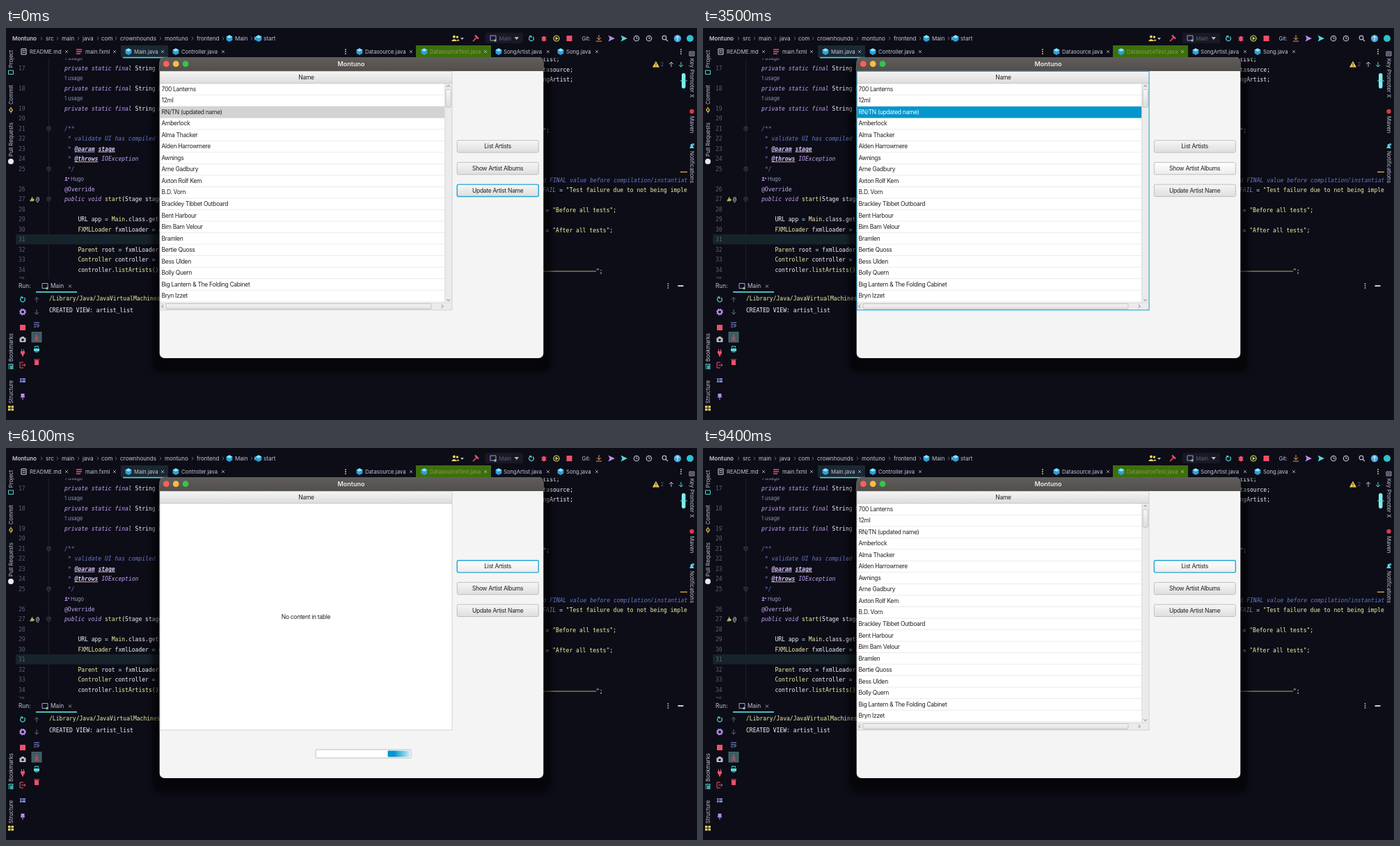
Write an HTML page that moves like this. It is 993 by 564 pixels and loops after 9.5 s.

```html
<!DOCTYPE html>
<html lang="en">
<head>
<meta charset="utf-8">
<title>Montuno</title>
<style>
html, body { margin: 0; width: 100%; height: 100%; overflow: hidden; background: #0c0d17; }
svg { display: block; width: 993px; height: 564px; }
text { white-space: pre; font: 7.7px Inter, sans-serif; fill: #c4c6d4; }
.crumb { font-size: 8.1px; }
.b { font-weight: 600; }
.code { font: 8.04px "DejaVu Sans Mono", monospace; fill: #f4f4f8; }
.fx { font-size: 8.5px; letter-spacing: -.035em; fill: #222; }
.mid { text-anchor: middle; }
.k { fill: #c3a0f2; font-style: italic; }
.a { fill: #c8a8f4; }
.c { fill: #6878c8; font-style: italic; }
.d { fill: #dcc8ff; font-style: italic; font-weight: bold; text-decoration: underline; }
.y { fill: #f3f4a6; }
.f { fill: #8f9bc4; font-style: italic; }
.g { fill: #5c6078; }
.n { fill: #a6ecf2; }
</style>
</head>
<body>
<svg id="stage" viewBox="0 0 993 564"></svg>
<script>
const LOOP = 9500, ROW = 16.53, ACCENT = '#0396cd', BACK = '#0c0d17';
const PURPLE = '#b98cf0', RED = '#f0506a', TEAL = '#5cd6d8', GREY = '#b9bccb', YELLOW = '#f2d75c';

// Drawing helpers: each returns SVG markup; text is placed by its vertical centre.
const esc = s => s.replace(/&/g, '&amp;').replace(/</g, '&lt;');
const text = (x, y, s, cls = '', more = '') => `<text x="${x}" y="${y + 2.9}" class="${cls}" ${more}>${esc(s)}</text>`;
const rect = (x, y, w, h, fill, more = '') => `<rect x="${x}" y="${y}" width="${w}" height="${h}" fill="${fill}" ${more}/>`;
const path = (d, stroke = GREY, more = '') => `<path d="${d}" fill="none" stroke="${stroke}" ${more}/>`;
const shape = (d, fill) => `<path d="${d}" fill="${fill}"/>`;
const dot = (x, y, r, fill, more = '') => `<circle cx="${x}" cy="${y}" r="${r}" fill="${fill}" ${more}/>`;
const group = (id, s, more = '') => `<g id="${id}" ${more}>${s}</g>`;
const side = (x, y, s, turn) => `<text class="mid" transform="translate(${x} ${y}) rotate(${turn})" y="2.8">${s}</text>`;
const code = (x, y, ...parts) => `<text class="code" x="${x}" y="${y + 2.9}">` +
  parts.map(p => `<tspan class="${p[0]}">${esc(p.slice(2))}</tspan>`).join('') + '</text>';

// Icons
const cross = (x, y = 34) => path(`M${x - 2} ${y - 2}l4 4m0-4l-4 4`, GREY, 'stroke-width=".8"');
const cube = (x, y = 34) => shape(`M${x} ${y - 4.8}l4.4 2.3v5l-4.4 2.4l-4.4-2.4v-5z`, '#2d9fd8') +
  shape(`M${x} ${y - 4.8}l4.4 2.3l-4.4 2.4l-4.4-2.4z`, '#8be4f4');
const kebab = (x, y, c = GREY) => [-3, 0, 3].map(d => dot(x, y + d, .9, c)).join('');
const ring = (x, y, r, c) => dot(x, y, r, 'none', `stroke="${c}" stroke-width="1.2"`);
const reload = (x, y, c) => path(`M${x + 2} ${y - 2.6}a3.4 3.4 0 1 1-4 0`, c, 'stroke-width="1.2"') + shape(`M${x - 3.6} ${y - 4}h4v3.6z`, c);
const arrow = (x, y, dir, c = GREY) => path(`M${x} ${y - 3.5}v7M${x - 3} ${y + dir * .5}l3 ${dir * 3}l3 ${-dir * 3}`, c);
const chevron = (x, y, dx, dy) => path(`M${x - dx * 1.2 - dy * 2.4} ${y - dy * 1.2 - dx * 2.4}L${x + dx * 1.2} ${y + dy * 1.2}L${x - dx * 1.2 + dy * 2.4} ${y - dy * 1.2 + dx * 2.4}`, '#666', 'stroke-width=".9"');
const plane = (x, y, c) => shape(`M${x - 4.5} ${y - 4.5}L${x + 5} ${y}L${x - 4.5} ${y + 4.5}l2-4.5z`, c);
const clock = (x, y, c) => ring(x, y, 3.7, c) + path(`M${x} ${y - 2.2}v2.4h2`, c);
const bug = (x, y, c) => `<ellipse cx="${x}" cy="${y + .5}" rx="2.8" ry="3.8" fill="${c}"/>` + path(`M${x - 4} ${y - 2}l8 5m0-5l-8 5`, c, 'stroke-width=".8"');
const terminal = (x, y) => path(`M${x - 4} ${y - 4}h8v7h-8z`, PURPLE) + dot(x + 3, y + 3, 1.7, '#68e27c');

function topBar() {
  const crumbs = [[57, 'src'], [80, 'main'], [110, 'java'], [137, 'com'], [164, 'crownhounds'], [228, 'montuno'], [274, 'frontend'], [329, 'Main'], [370, 'start']];
  let s = text(9, 15, 'Montuno', 'crumb b') + crumbs.map(c => text(c[0], 15, c[1], 'crumb')).join('');
  for (const x of [51, 74, 104, 132, 158, 222, 268, 312, 353])
    s += path(`M${x - 1} 12.7l2 2.3l-2 2.3`, '#777b92', 'stroke-width=".8"');
  s += cube(321, 15) + shape('M357 12l3.5 3l-3.5 3z', '#6ea8f0') + cube(363, 15);
  s += dot(644, 12.5, 2, YELLOW) + shape('M640 19q4-6 8 0z', YELLOW) + dot(648.5, 13, 1.7, YELLOW) + shape('M647 18.5q3-4 4.5 0z', YELLOW) + shape('M653 14h5l-2.5 3z', GREY);
  s += path('M671 19l6-6', RED, 'stroke-width="1.6"') + path('M674 10.5l5 5', RED, 'stroke-width="2.4"');
  s += rect(689, 7, 54, 15, '#181924', 'rx="2"') + terminal(700, 15) + text(708.5, 15, 'Main', 'g') + shape('M730.5 13h6.5l-3.2 4z', GREY);
  s += reload(755, 15, TEAL) + bug(773, 15, RED) + ring(791, 15, 4, '#d8e05c') + shape('M789.7 12.5l4 2.5l-4 2.5z', '#d8e05c') + rect(805.5, 11, 8, 8, RED);
  s += text(827.5, 15, 'Git:') + arrow(852, 13.5, 1, '#f59a50') + path('M848 19h8', '#f59a50') + plane(870, 15, PURPLE) + plane(888, 15, TEAL) + clock(906, 15, GREY) + clock(924, 15, GREY);
  return s + ring(946, 14, 2.8, GREY) + path('M948 16l3 3', GREY, 'stroke-width="1.2"') + dot(965, 15, 5.2, '#3fa6e0') + arrow(965, 15, -1, '#fff') + dot(983, 15, 5, '#2fc0cc');
}

function tabs() {
  let s = rect(14, 24, 965, 19.5, BACK) + rect(165, 25, 68, 17, '#1a2833') + rect(168, 41.8, 65, 1.6, TEAL) + rect(589, 25, 108, 17, '#3d6f0c');
  s += path('M22 30h7v8h-7zM23.5 32.5h4m-4 2.5h4', '#ddd') + path('M101 31h8m-8 3h8m-8 3h6', RED, 'stroke-width="1.5"');
  const names = [[34, 'README.md'], [114, 'main.fxml'], [184, 'Main.java'], [252, 'Controller.java'], [516, 'Datasource.java'], [715, 'SongArtist.java'], [805, 'Song.java']];
  s += names.map(n => text(n[0], 34, n[1])).join('') + text(609, 34, 'DatasourceTest.java', '', 'style="fill:#8a9a55"');
  s += [176, 244, 508, 601, 708, 797].map(x => cube(x)).join('');
  s += [87, 156, 225, 312, 582, 689, 779, 849].map(x => cross(x)).join('');
  return s + kebab(488, 34, YELLOW) + kebab(970, 34, YELLOW);
}

function editor() {
  const at = k => 58 + 14.48 * k;
  let s = rect(14, at(17) - 7.3, 207, 14.5, '#17232b') + path('M61.5 44V361', '#1d1f2e');
  const numbered = [0, 2, 4, 5, 6, 7, 8, 9, 10, 12, 13, 14, 15, 16, 17, 18, 19, 20, 21];
  numbered.forEach((k, i) => s += code(18, at(k), 'g:' + (17 + i)));
  for (const k of [-1, 1, 3]) s += text(84, at(k), '1 usage', '', 'style="font-size:7.4px;fill:#8d90b4"');
  for (const k of [0, 2, 4]) s += code(84, at(k), 'k:private static final ', 'w:String ', 'f:' + 'MMF'[k / 2]);
  s += code(84, at(6), 'c:/**') + code(84, at(7), 'c: * validate UI has compiled');
  s += code(84, at(8), 'c: * ', 'd:@param', 'c: ', 'd:stage') + code(84, at(9), 'c: * ', 'd:@throws', 'c: ', 'k:IOException') + code(84, at(10), 'c: */');
  const wave = (x, y, n) => path(`M${x} ${y}` + 'l1.5-1.5l1.5 1.5'.repeat(n), '#c79a45', 'stroke-width=".7"');
  s += wave(133, at(8) + 5, 8) + wave(98, at(9) + 5, 11);
  s += dot(86.5, at(11) - 1.5, 1.4, PURPLE) + shape(`M84 ${at(11) + 2.5}q2.5-4 5 0z`, PURPLE) + dot(90, at(11) - 1, 1.1, PURPLE) + text(93, at(11), 'Hugo', '', 'style="font-size:7.4px;fill:#9a9cc0"');
  s += code(84, at(12), 'a:@Override') + code(84, at(13), 'k:public void ', 'y:start', 'w:(Stage stage)');
  s += shape(`M34 ${at(13) + 3}l4-7l1 7z`, '#7cc86c') + dot(39, at(13) + 1, 1.7, '#f59a50') + code(43, at(13), 'w:@');
  s += code(103.4, at(15), 'w:URL app ', 'n:= ', 'y:Main', 'w:.class.get') + code(103.4, at(16), 'y:FXMLLoader', 'w: fxmlLoader ', 'n:= ', 'k:n');
  s += code(103.4, at(18), 'y:Parent', 'w: root ', 'n:= ', 'w:fxmlLoader.') + code(103.4, at(19), 'y:Controller', 'w: controller ', 'n:= ') + code(103.4, at(20), 'w:controller.', 'y:listArtists()');
  for (const k of [6, 10, 13]) s += path(`M59 ${at(k) - 2.5}h5v4l-2.5 2l-2.5-2zM60 ${at(k)}h3`, '#4c5068', 'stroke-width=".8"');

  s += code(771.5, 45.2, 'w:tist;') + code(771.5, 59.7, 'w:tasource;') + code(771.5, 74.2, 'w:ngArtist;') + code(771.5, 146.7, 'n:*;');
  s += code(771.5, 219, 'c:d FINAL value before compilation/instantiat') + code(771, 233.5, 'f:FAIL', 'n: = ', 'y:"Test failure due to not being imple');
  s += code(775.6, 262.5, 'n:= ', 'y:"Before all tests"', 'w:;') + code(775.6, 291.5, 'n:= ', 'y:"After all tests"', 'w:;');
  s += path('M771 350H848', '#d9dc92', 'stroke-width=".8"') + code(848, 350, 'y:"', 'w:;');
  s += shape('M934 47.5l5 9h-10z', '#f2c850') + path('M934 50.5v3m0 1v1', '#222') + text(940.5, 52.5, '2', 'g') + arrow(956, 52.5, -1) + arrow(970, 52.5, 1, TEAL);
  return s + rect(971, 65, 5.5, 22, '#7deef0', 'rx="2.7"') + path('M969 76h10', TEAL) + rect(969, 206.5, 10, 1.5, '#c9a040');
}

function sideBars() {
  let s = side(7, 44.5, 'Project', -90) + side(7, 96, 'Commit', -90) + side(7, 160.5, 'Pull Requests', -90) + side(7, 459.5, 'Bookmarks', -90) + side(7, 523.5, 'Structure', -90);
  s += side(985.5, 72, 'Key Promoter X', 90) + side(985.5, 139, 'Maven', 90) + side(985.5, 200, 'Notifications', 90);
  s += path('M3.5 61h7v5.5h-7z', TEAL) + ring(7, 118, 2, YELLOW) + path('M7 113.5v2.5m0 4v2.5', YELLOW) + dot(7, 192, 4, '#e8e8ee');
  s += rect(3.5, 483, 7, 8, '#3fa9a8') + path('M5 491V485h4', BACK) + rect(3, 543.5, 8, 7, YELLOW) + path('M3 547h8M7 543v8', BACK);
  return s + path('M982 34h7v6h-7zM983 36h5m-5 2h5', GREY, 'stroke-width=".9"') + dot(985.5, 120, 3.2, '#d83a48') + shape('M982 173q2-2 2-6h3q0 4 2 6z', TEAL) + dot(987.5, 167.5, 1.8, '#5aa0f0');
}

function runPanel() {
  let s = rect(14, 361, 965, 201, BACK) + text(18, 371.5, 'Run:', '', 'style="font-size:8.3px"') + terminal(56, 371.5) + text(64, 371.5, 'Main', '', 'style="font-size:8.3px"') + cross(92, 371.5) + rect(43, 379, 59, 1.7, TEAL);
  s += kebab(951.5, 371) + rect(965.5, 370.2, 8, 1.7, '#eee');
  s += code(62, 389.5, 'y:/Library/Java/JavaVirtualMachines/') + code(62, 406, 'w:CREATED VIEW: artist_list');
  s += reload(24, 390.5, TEAL) + dot(24, 408.5, 3, 'none', `stroke="${PURPLE}" stroke-width="2"`) + dot(24, 408.5, 4.2, 'none', `stroke="${PURPLE}" stroke-width="1.4" stroke-dasharray="1.65"`) + rect(20, 427, 8, 8, RED);
  s += rect(19.5, 445.5, 9, 6.5, GREY, 'rx="1"') + rect(22, 444, 4, 2, GREY) + dot(24, 448.7, 1.8, BACK) + shape('M21 465h6v3l-2 2.5v2h-2v-2l-2-2.5z', RED) + path('M22.5 462v3m3-3v3', RED);
  s += path('M25 481h-5v8h5M22 485h6m-2-2l2 2l-2 2', RED) + rect(20, 504, 8, 6, '#7d86d8') + path('M20 506.5h8M23 504v6', BACK, 'stroke-width=".8"') + shape('M21.5 526h5v4l1 1.5h-7l1-1.5z', PURPLE) + path('M24 531v4', PURPLE);
  s += arrow(44, 391, -1, '#666a80') + arrow(44, 408.5, 1, '#666a80') + path('M40 424h8m-8 3h7q1.5 3-3 3m-4 0h3', '#8c9af0') + rect(37, 437.5, 14, 14.5, '#3c5a60', 'stroke="#5c8c90" stroke-width=".6"') + arrow(44, 444, 1, RED) + path('M40.5 449h7', RED);
  return s + rect(40, 461, 8, 4, TEAL) + path('M41.5 460v-2h5v2M41.5 466h5', TEAL) + rect(41, 478, 6, 7, RED) + path('M40 477h8', RED);
}

const artists = ['700 Lanterns', '12ml', 'RN/TN (updated name)', 'Amberlock', 'Alma Thacker', 'Alden Harrowmere', 'Awnings', 'Arne Gadbury', 'Axton Rolf Kem',
  'B.D. Vorn', 'Brackley Tibbet Outboard', 'Bent Harbour', 'Bim Bam Velour', 'Bramlen', 'Bertie Quoss', 'Bess Ulden', 'Bolly Quern', 'Big Lantern & The Folding Cabinet', 'Bryn Izzet'];
const albums = ['For Ships Bound To Drift (We Await Dawn)', "If They Seek Smoke They'll See It"];

const rows = list => list.map((s, i) => text(223.5, 87.8 + ROW * i, s, 'fx', i == 2 ? 'id="picked"' : '')).join('');
const rules = w => Array.from({ length: 19 }, (_, i) => rect(221, 95.8 + ROW * i, w, .8, '#e6e6e6')).join('');
const thumb = (x, y, w, h) => rect(x, y, w, h, 'url(#normal)', 'rx="1.5" stroke="#b5b5b5" stroke-width=".7"');
const hbar = end => rect(221, 395.3, 420, 10.2, '#ebebeb') + rect(221, 395, 420, .7, '#cfcfcf') + thumb(230, 396.8, end - 230, 7.6) + chevron(225, 400.5, -1, 0) + chevron(end == 611 ? 627 : 637, 400.5, 1, 0);

function appWindow() {
  let s = rect(209.5, 50, 574, 446, '#000', 'rx="14" opacity=".55" filter="url(#blur)"') + rect(220.7, 42, 551.6, 433, '#f4f4f4', 'rx="7"');
  s += shape('M220.7 62V49q0-7 7-7h537.6q7 0 7 7v13z', 'url(#title)') + dot(230.3, 51.7, 4.4, '#fc605b') + dot(244.2, 51.7, 4.4, '#fdbc40') + dot(258, 51.7, 4.4, '#34c648');
  s += text(496, 51.7, 'Montuno', 'b mid', 'style="font-size:9px;fill:#ececec"') + rect(221, 62, 420.5, 344, '#fff');
  s += group('artists', rules(410) + rect(221, 112.9, 409.5, ROW, '#d3d3d3', 'id="pick"') + rows(artists) + hbar(611) +
    rect(630.5, 80, 10.5, 315.5, '#ebebeb') + rect(630.5, 80, .7, 315.5, '#cfcfcf') + thumb(632, 88.5, 7.4, 25.5) + chevron(635.7, 83.5, 0, -1) + chevron(635.7, 391.5, 0, 1));
  s += group('albums', rules(420) + rows(albums) + hbar(631));
  s += group('loading', text(431, 242.7, 'No content in table', 'fx mid') +
    rect(445, 434, 137.2, 12, '#fff', 'rx="1.5" stroke="#b6b6b6" stroke-width=".9"') +
    group('track', rect(2.1, 435.6, 37.2, 8.8, 'url(#tail)', 'id="bar" rx="1"'), 'clip-path="url(#inside)"'));
  s += rect(221, 62, 420, 18, 'url(#head)') + rect(221, 79.3, 420, .8, '#c4c4c4') + text(431.5, 71, 'Name', 'fx mid');
  s += rect(221.2, 62.3, 419.9, 343.5, 'none', 'id="frame"');
  ['List Artists', 'Show Artist Albums', 'Update Artist Name'].forEach((label, i) => {
    const y = 161.7 + 31.7 * i;
    s += rect(648.3, y, 117, 17.4, 'none', `id="btn${i}" rx="2"`) + text(706.7, y + 8.6, label, 'fx mid');
  });
  return s;
}

const fade = (id, stops, more = 'x2="0" y2="1"') => `<linearGradient id="${id}" ${more}>` +
  stops.map(([o, c, a = 1]) => `<stop offset="${o}" stop-color="${c}" stop-opacity="${a}"/>`).join('') + '</linearGradient>';
const defs = '<defs>' + fade('title', [[0, '#605d5b'], [1, '#514e4c']]) + fade('head', [[0, '#f5f5f5'], [1, '#dcdcdc']]) +
  fade('normal', [[0, '#f6f6f6'], [1, '#dedede']]) + fade('hover', [[0, '#ffffff'], [1, '#ebebeb']]) + fade('armed', [[0, '#d6d6d6'], [1, '#c8c8c8']]) +
  fade('tail', [[0, ACCENT], [.25, ACCENT], [1, ACCENT, 0]], '') +
  '<filter id="blur"><feGaussianBlur stdDeviation="3"/></filter><clipPath id="inside"><rect x="446.5" y="435" width="134.2" height="10"/></clipPath></defs>';

const stage = document.getElementById('stage');
stage.innerHTML = defs + topBar() + editor() + tabs() + sideBars() + runPanel() + appWindow();

const $ = id => document.getElementById(id);
const set = (id, attrs) => { for (const k in attrs) $(id).setAttribute(k, attrs[k]); };
const show = (id, on) => set(id, { display: on ? 'inline' : 'none' });
const within = (t, a, b) => t >= a && t < b;
const easeBoth = t => t < .2 ? 3.125 * t * t : t > .8 ? 1 - 3.125 * (1 - t) ** 2 : 1.25 * t - .125;

// The bar crosses the track, flips and returns within four seconds.
function moveBar(t) {
  const p = 2 * easeBoth(((t - 3780 + 4000) % 4000) / 4000), back = p > 1;
  const x = 444.6 - 41.3 + 179.1 * (back ? 2 - p : p);
  set('bar', { transform: back ? `translate(${x} 0)` : `translate(${x + 41.3} 0) scale(-1 1)` });
}

function render(t) {
  const listed = t < 3700 || t >= 7800, loading = within(t, 5300, 7800);
  const tableFocus = within(t, 2100, 3600);
  const focus = t < 2100 ? 2 : tableFocus ? -1 : t < 5200 ? 1 : 0;
  const hover = within(t, 2500, 4500) ? 1 : t >= 4700 ? 0 : -1;
  const armed = within(t, 3600, 3700) ? 1 : within(t, 5200, 5300) ? 0 : -1;
  show('artists', listed);
  show('albums', !listed && !loading);
  show('loading', loading);
  show('pick', t < 3700);
  set('pick', { fill: tableFocus ? ACCENT : '#d3d3d3' });
  $('picked').style.fill = tableFocus ? '#fff' : '#222';
  set('frame', { stroke: tableFocus ? '#22a6d3' : '#c6c6c6', 'stroke-width': tableFocus ? 1.1 : .8 });
  for (let i = 0; i < 3; i++) set('btn' + i, {
    fill: `url(#${i == armed ? 'armed' : i == hover ? 'hover' : 'normal'})`,
    stroke: i == focus ? '#22a6d3' : '#b8b8b8', 'stroke-width': i == focus ? 1.4 : .9
  });
  if (loading) moveBar(t);
}

const start = performance.now();
(function tick() {
  render((performance.now() - start) % LOOP);
  requestAnimationFrame(tick);
})();
</script>
</body>
</html>
```
